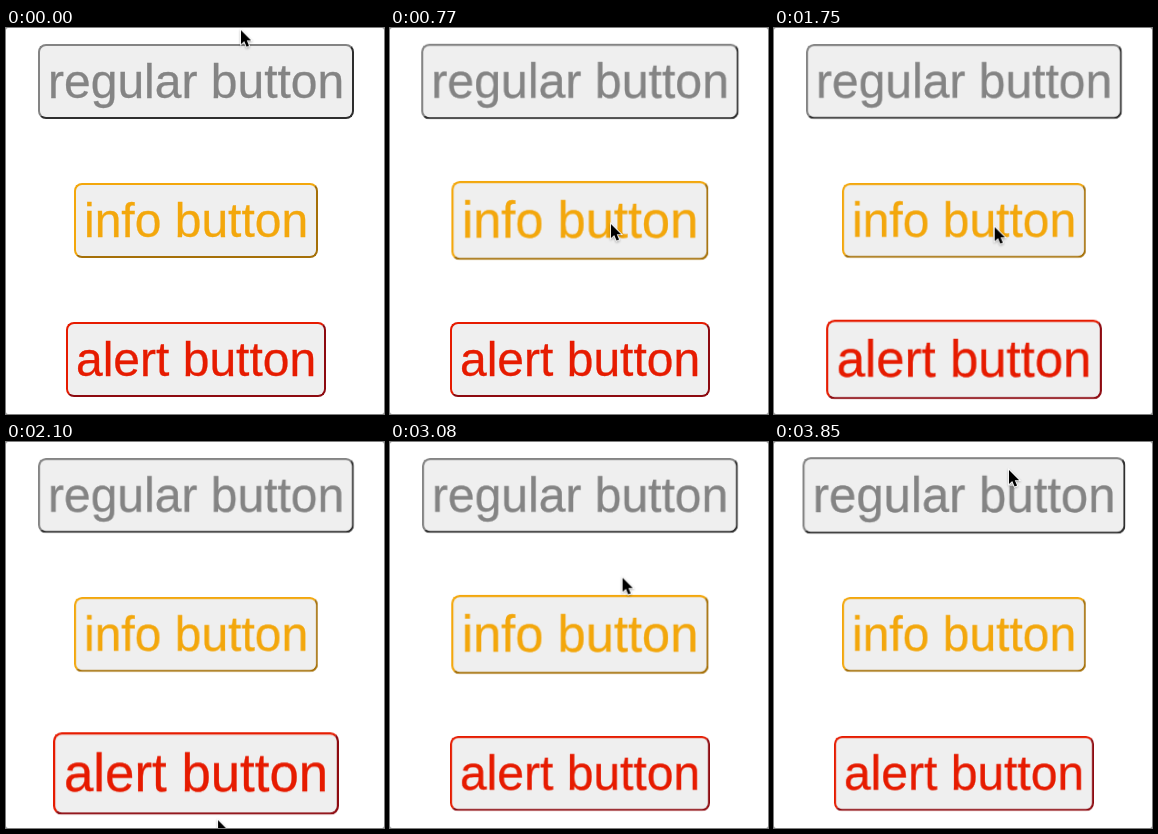
Recreate the animation shown at these times as an HTML page. Size 378 by 386 pixels, loop 3920 ms.

```html
<!DOCTYPE html>
<html lang="en">
<head>
<meta charset="utf-8">
<title>Hover buttons</title>
<style>
  html, body { margin: 0; width: 100%; height: 100%; overflow: hidden; background: #8a8a8a; }
  .stage {
    position: relative; width: 378px; height: 386px; overflow: hidden;
    background: #fff; border-radius: 2px;
  }
  .list {
    position: absolute; left: 0; top: 16px; width: 380px;
    display: flex; flex-direction: column; align-items: center; gap: 64px;
  }
  .btn {
    box-sizing: border-box; height: 75px; padding: 8px;
    border: 2px solid; border-color: var(--c) var(--d) var(--d) var(--c);
    border-radius: 8px; background: #efefef; color: var(--c);
    font: 48px/55px "Liberation Sans", Arial, sans-serif; white-space: nowrap;
    -webkit-text-stroke: .3px;
    animation: 3920ms ease infinite;
  }
  .regular { --c: #848484; --d: #2e2e2e; animation-name: regular; }
  .info { --c: #f3a70c; --d: #a57008; animation-name: info; }
  .alert { --c: #e61b00; --d: #8d0a10; animation-name: alert; }
  .cursor {
    position: absolute; left: -2px; top: -2px; width: 16px; height: 22px;
    filter: drop-shadow(0 1px 1px rgba(0, 0, 0, .3));
    animation: cursor 3920ms linear infinite;
  }

  @keyframes regular {
    0%, 1.28% { transform: scale(1); }
    8.93%, 14.13% { transform: scale(1.1); }
    21.79%, 79.85% { transform: scale(1); }
    85.84% { transform: scale(1.096); }
    88.78% { transform: scale(1.04); }
    91.84%, 94.39% { transform: scale(1.1); animation-timing-function: cubic-bezier(.35, .2, .6, .95); }
    98.21%, 100% { transform: scale(1.022); }
  }
  @keyframes info {
    0%, 17.27% { transform: scale(1); }
    24.92%, 26.94% { transform: scale(1.1); }
    34.59%, 66.84% { transform: scale(1); }
    68.88% { transform: scale(1.02); animation-timing-function: linear; }
    69.64% { transform: scale(1.016); }
    72.96%, 74% { transform: scale(1); }
    78.06% { transform: scale(1.06); }
    84%, 100% { transform: scale(1); }
  }
  @keyframes alert {
    0%, 31.07% { transform: scale(1); }
    38.72%, 41.33% { transform: scale(1.1); }
    43.88% { transform: scale(1.04); }
    47.45%, 53.57% { transform: scale(1.1); }
    61.22%, 69.64% { transform: scale(1); }
    72.19% { transform: scale(1.05); }
    77.81%, 100% { transform: scale(1); }
  }
  @keyframes cursor {
    0% { transform: translate(235px, 2px); }
    1.79% { transform: translate(235px, 17px); }
    3.57% { transform: translate(234px, 35px); }
    8.93% { transform: translate(232px, 52px); }
    12% { transform: translate(231px, 54px); }
    14.13% { transform: translate(226px, 95px); }
    17.27% { transform: translate(222px, 155px); }
    19.64% { transform: translate(221px, 196px); }
    25% { transform: translate(221px, 212px); }
    26.94% { transform: translate(222px, 234px); }
    31.07% { transform: translate(223px, 294px); }
    32.14% { transform: translate(223px, 316px); }
    39.29% { transform: translate(222px, 335px); }
    41.33% { transform: translate(222px, 294px); }
    43.88% { transform: translate(221px, 162px); }
    46.68% { transform: translate(220px, 294px); }
    48.47% { transform: translate(218px, 335px); }
    51.79% { transform: translate(214px, 352px); }
    53.57% { transform: translate(212px, 378px); }
    55.36%, 62.5% { transform: translate(213px, 390px); }
    65.31% { transform: translate(220px, 330px); }
    67.6% { transform: translate(222px, 215px); }
    68.37% { transform: translate(223px, 230px); }
    69.64% { transform: translate(224px, 301px); }
    70.92% { transform: translate(224px, 325px); }
    72.19% { transform: translate(224px, 294px); }
    74% { transform: translate(226px, 230px); }
    78.06% { transform: translate(232px, 155px); }
    79.85% { transform: translate(234px, 91px); }
    82.14%, 84.18% { transform: translate(235px, 57px); }
    85.71% { transform: translate(235px, 98px); }
    87.12% { transform: translate(235px, 250px); }
    88.78% { transform: translate(235px, 95px); }
    91.07%, 92.86% { transform: translate(235px, 52px); }
    94.39% { transform: translate(235px, 95px); }
    96.17% { transform: translate(235px, 213px); }
    97.7% { transform: translate(235px, 91px); }
    98.21%, 100% { transform: translate(235px, 28px); }
  }
</style>
</head>
<body>
<div class="stage">
  <div class="list">
    <div class="btn regular">regular button</div>
    <div class="btn info">info button</div>
    <div class="btn alert">alert button</div>
  </div>
  <svg class="cursor" viewBox="-2 -2 16 22">
    <path d="M0 0V14L3.2 11.1L5.6 16.6L8.1 15.5L5.8 10.2H10.2Z" fill="#000" stroke="#fff" stroke-width="1.6" paint-order="stroke"/>
  </svg>
</div>
</body>
</html>
```
